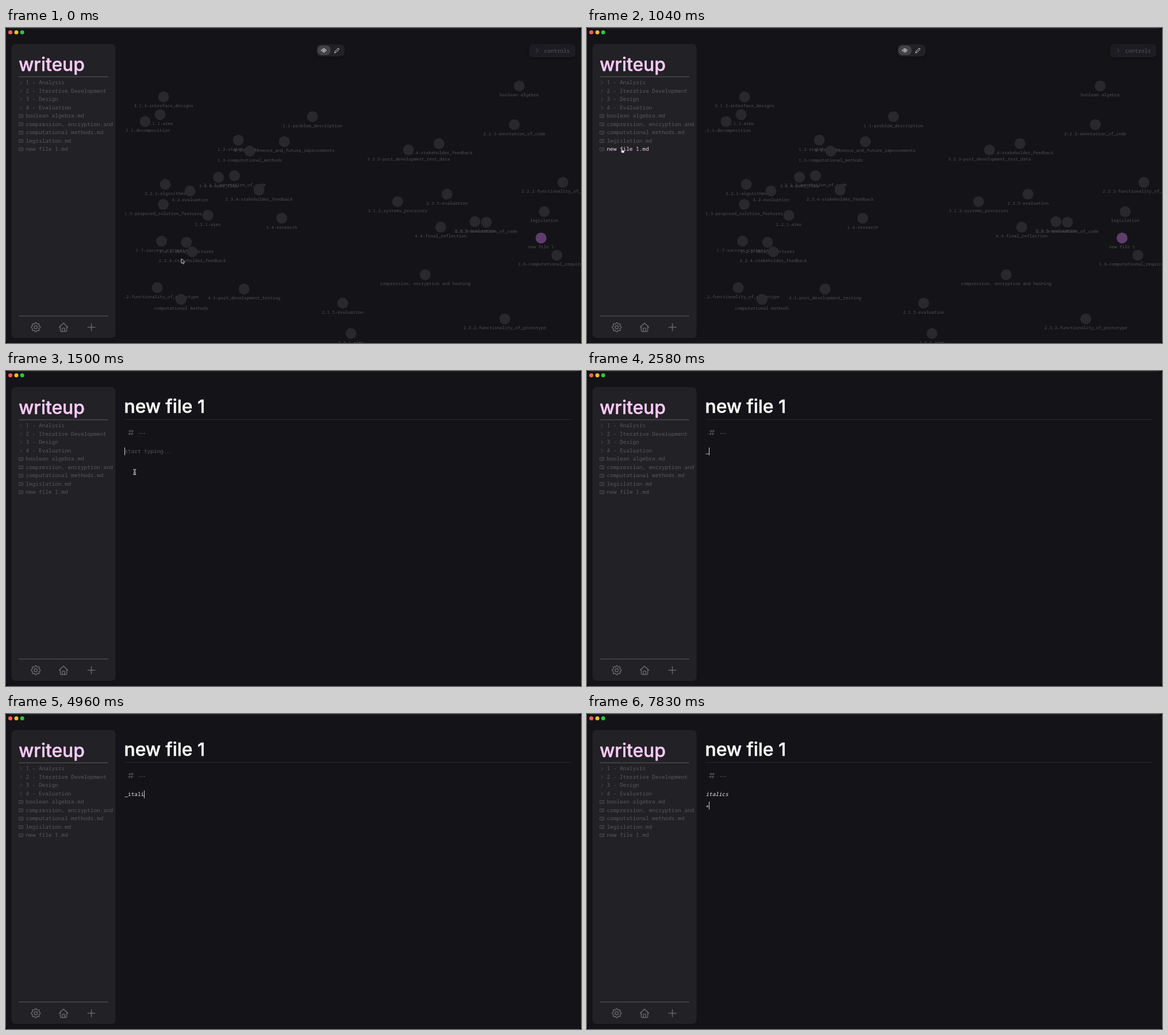
Animation, 1000 px wide and 549 px high, one loop 8000 ms. Source, as an HTML page:

```html
<!DOCTYPE html>
<html lang="en">
<head>
<meta charset="utf-8">
<title>writeup</title>
<style>
  html, body { margin: 0; width: 100%; height: 100%; overflow: hidden; background: #000; }
  svg { display: block; width: 100%; height: 100%; }
  text { font: 9.37px "Noto Sans Mono", "DejaVu Sans Mono", monospace; white-space: pre; }
  .title { font: 500 31.8px Inter, "Open Sans", sans-serif; stroke-width: .5; stroke-linejoin: round; }
  .logo { fill: #fbcbf9; stroke: #fbcbf9; }
  .heading { fill: #fff; stroke: #fff; }
  .dim { fill: #59585c; }
  .hover { fill: #f6d3f5; }
  .icon { fill: none; stroke: #59585c; stroke-linecap: round; stroke-linejoin: round; }
  .big { stroke: #67666b; stroke-width: 1.5; }
  #list path { stroke-width: .8; }
  #nodes circle { fill: #29282d; }
  #nodes circle.current { fill: #5f3e6d; }
  #nodes text { font-size: 7.5px; fill: #505054; text-anchor: middle; }
  #typed, #second { fill: #e6e5e8; }
  #arrow { fill: #111; stroke: #eee; stroke-width: .8; stroke-linejoin: round; }
  #hand { fill: #eee; stroke: #111; stroke-width: .8; stroke-linejoin: round; }
  #beam { fill: none; stroke: #eee; stroke-width: 1.9; stroke-linecap: round; }
  #beam path + path { stroke: #222; stroke-width: .7; }
</style>
</head>
<body>
<svg viewBox="0 0 1000 549" preserveAspectRatio="none">
  <defs>
    <clipPath id="listClip"><rect x="10" y="86" width="176.5" height="400"/></clipPath>
    <clipPath id="graphClip"><rect x="203" y="16" width="797" height="533"/></clipPath>
    <filter id="shadow" x="-20%" y="-40%" width="140%" height="200%">
      <feDropShadow dx="0" dy="2" stdDeviation="3" flood-opacity=".3"/>
    </filter>
  </defs>

  <rect width="1000" height="549" rx="5" fill="#141317"/>
  <path d="M6 .5H994" stroke="#2c2b2f" stroke-width=".8"/>
  <circle cx="7.5" cy="7.5" r="3.5" fill="#ff5f57"/>
  <circle cx="18" cy="7.5" r="3.5" fill="#febc2e"/>
  <circle cx="28.2" cy="7.5" r="3.5" fill="#28c840"/>

  <g id="graph">
    <g id="nodes" clip-path="url(#graphClip)"></g>
    <g filter="url(#shadow)">
      <rect x="540" y="28.5" width="49" height="21" rx="8" fill="#222126"/>
      <rect x="909.5" y="28" width="81" height="23" rx="7" fill="#1e1d21"/>
    </g>
    <rect x="541.8" y="30.6" width="22.4" height="16.6" rx="7" fill="#434247"/>
    <g class="icon" style="stroke:#eee">
      <path d="M548.6 39Q552.8 32.8 557 39Q552.8 45.2 548.6 39Z"/>
      <circle cx="552.8" cy="39" r="1.2"/>
      <path d="M571.6 43L572.2 40.6L577 35.8Q578.2 35 579 36.2Q579.4 37 578.8 37.6L574 42.4Z" stroke-width=".9"/>
    </g>
    <path class="icon" d="M922.6 36.6L925.4 39.4L922.6 42.2"/>
    <text x="935.8" y="42.8" class="dim">controls</text>
  </g>

  <g id="editor">
    <text x="205.5" y="73" class="title heading">new file 1</text>
    <path d="M206 84.5H984" stroke="#29282c"/>
    <path class="icon" d="M213 104.7H222M212.2 109.5H221.2M216 102.6L214.6 111.8M219.8 102.6L218.4 111.8"/>
    <g class="dim">
      <circle cx="232.6" cy="108.8" r=".9"/><circle cx="236.6" cy="108.8" r=".9"/><circle cx="240.6" cy="108.8" r=".9"/>
    </g>
    <text id="placeholder" x="206.5" y="143.3" class="dim">start typing<tspan letter-spacing="-.9">...</tspan></text>
    <text id="typed" x="206.5" y="143.3"></text>
    <text id="second" x="206.5" y="165.6">*</text>
    <rect id="caret" width="1" height="13.5" fill="#d4d4d6"/>
  </g>

  <rect x="9.5" y="28" width="181" height="512" rx="7" fill="#222125"/>
  <text x="22" y="75" class="title logo">writeup</text>
  <path d="M22 85H178M22 502H178" stroke="#5d5c60"/>
  <g id="list" clip-path="url(#listClip)"></g>
  <g class="icon big">
    <path id="gear"/>
    <circle cx="51.7" cy="521.5" r="2.7"/>
    <path d="M92.6 521.4L100 514.4L107.4 521.4M94.4 520V527.6Q94.4 529 95.8 529H104.2Q105.6 529 105.6 527.6V520M97.8 529V524.4Q97.8 523 99.2 523H100.8Q102.2 523 102.2 524.4V529"/>
    <path d="M142.2 521.5H154.8M148.5 515.2V527.8"/>
  </g>

  <g id="mouse">
    <path id="arrow" d="M0 0V8.2L1.9 6.5L3.2 9.3L4.7 8.6L3.4 5.9H6Z"/>
    <path id="hand" d="M-1 .2Q0-.8.8.2V3.2L3.6 3.8Q4.6 4.2 4.4 5.2L3.8 8.4H-.4L-2.6 5.4Q-2.6 4.2-1 5Z"/>
    <g id="beam"></g>
  </g>
</svg>

<script>
const LOOP = 8000, CHAR = 5.62;
const $ = id => document.getElementById(id);

function add(parent, tag, attrs, text = "") {
  const el = document.createElementNS("http://www.w3.org/2000/svg", tag);
  for (const name in attrs) el.setAttribute(name, attrs[name]);
  el.textContent = text;
  return parent.appendChild(el);
}

const nodes = [
  [892.5, 101, "boolean algebra"], [274, 120, "3.1.3-interface_designs"],
  [268, 151, "2.1.1-aims"], [242, 163, "3.1.1-decomposition"],
  [533, 154.5, "1.1-problem_description"], [884, 168.5, "2.2.3-annotation_of_code"],
  [753, 201.5, "2.1.4-stakeholder_feedback"], [700, 212.5, "3.2.3-post_development_test_data"],
  [404, 195.5, "1.2-stakeholders"], [484, 198, "4.3-maintenence_and_future_improvements"],
  [424, 214.5, "1.3-computational_methods"], [397.5, 257.5, "2.1.3-annotation_of_code"],
  [369.5, 260, "3.1.4-user_flow"], [277, 272.5, "3.2.1-algorithms"],
  [320, 284, "4.2-evaluation"], [440, 282.5, "2.3.4-stakeholder_feedback"],
  [273.5, 307.5, "1.5-proposed_solution_features"], [351, 326.5, "2.2.1-aims"],
  [479.5, 331.5, "1.4-research"], [681, 302.5, "3.1.2-systems_processes"],
  [767, 289.5, "2.3.5-evaluation"], [968.5, 269, "2.2.2-functionality_of_prototype"],
  [936, 320, "legislation"], [756, 347, "4.4-final_reflection"],
  [815.5, 337.5, "2.2.5-evaluation"], [835.5, 338.5, "2.3.3-annotation_of_code"],
  [930.5, 366, "new file 1"], [958, 396, "1.6-computational_requirements"],
  [270.5, 371.5, "1.7-success_criteria"], [314, 373.5, "3.2.2-data_structures"],
  [324, 390, "2.2.4-stakeholder_feedback"], [729, 430, "compression, encryption and hashing"],
  [263, 452.5, "2.1.2-functionality_of_prototype"], [304.5, 473, "computational methods"],
  [414, 455, "4.1-post_development_testing"], [585.5, 479.5, "2.1.5-evaluation"],
  [867.5, 507, "2.3.2-functionality_of_prototype"], [600, 532.5, "2.3.1-aims"]
];
for (const [cx, cy, label] of nodes) {
  add($("nodes"), "circle", { cx, cy, r: 9.5, class: label === "new file 1" ? "current" : "" });
  add($("nodes"), "text", { x: cx, y: cy + 18.4 }, label);
}

const entries = ["1 - Analysis", "2 - Iterative Development", "3 - Design", "4 - Evaluation",
  "boolean algebra.md", "compression, encryption and hashing.md", "computational methods.md",
  "legislation.md", "new file 1.md"];
const rows = entries.map((name, i) => {
  const y = 95 + i * 14.5;
  const shape = name.endsWith(".md")
    ? "m-3.4-2.5h2.2q1.2 0 1.2 1q0-1 1.2-1h2.2v5h-2.3q-1.1 0-1.1.6q0-.6-1.1-.6h-2.3zm3.4 1v4.2"
    : "m-1.3-2.5l2.5 2.5l-2.5 2.5";
  add($("list"), "path", { class: "icon", d: `M26.2 ${y + .3}${shape}` });
  return add($("list"), "text", { x: 34.5, y: y + 3.2 }, name);
});

// Gear outline: eight rounded lobes
const gear = Array.from({ length: 64 }, (_, i) => {
  const a = i * Math.PI / 32, r = 7.1 + .85 * Math.tanh(2.5 * Math.cos(8 * a));
  return `${(51.7 + r * Math.sin(a)).toFixed(2)} ${(521.5 - r * Math.cos(a)).toFixed(2)}`;
});
$("gear").setAttribute("d", `M${gear.join("L")}Z`);

// Text cursor: a light outline with a dark core
const beam = "M-1.6-4.2Q0-4.2 0-3V3Q0 4.2-1.6 4.2M1.6-4.2Q0-4.2 0-3M0 3Q0 4.2 1.6 4.2M-1 1H1";
for (let i = 0; i < 2; i++) add($("beam"), "path", { d: beam });

// Editor states: start time, first line, second line (if any), italic flag
const OPEN = 1080, HIDE_MOUSE = 2560;
const edits = [
  [OPEN + 50, ""], [2500, "_"], [2950, "_i"], [3130, "_it"], [3330, "_ita"], [3500, "_ital"],
  [3670, "_itali"], [3880, "_italis"], [4920, "_itali"], [5250, "_italic"], [5290, "_italics"],
  [5710, "italics", null, true], [6750, "italics", "", true], [7830, "italics", "*", true]
];

// Mouse path: time, x, y
const path = [[40, 305, 402], [830, 61, 209.5], [1330, 61, 209.5], [1500, 223.5, 176], [1630, 240, 178]];
const easings = [p => p * p * (3 - 2 * p), p => p, p => p * (.6 + .4 * p), p => p * (2 - p)];

function mouseAt(t) {
  if (t <= path[0][0]) return path[0].slice(1);
  const i = path.findIndex(([time]) => time > t);
  if (i < 0) return path.at(-1).slice(1);
  const [t0, x0, y0] = path[i - 1], [t1, x1, y1] = path[i];
  const p = easings[i - 1]((t - t0) / (t1 - t0));
  return [x0 + (x1 - x0) * p, y0 + (y1 - y0) * p];
}

const show = (id, on) => $(id).setAttribute("display", on ? "inline" : "none");

function render(t) {
  const open = t >= OPEN;
  show("graph", !open);
  show("editor", open);

  const [start, first, second, italic] = edits.findLast(([time]) => time <= t) || edits[0];
  const onSecond = second != null;
  const column = (onSecond ? second : first).length;
  show("placeholder", !first);
  show("second", second === "*");
  $("typed").textContent = first;
  $("typed").style.fontStyle = italic ? "italic" : "normal";
  $("caret").setAttribute("x", Math.round(206 + column * CHAR));
  $("caret").setAttribute("y", onSecond ? 152.8 : 133.3);
  show("caret", t >= start && Math.floor((t - start) / 500) % 2 === 0);

  const [x, y] = mouseAt(t);
  const row = x > 22 && x < 186 ? Math.round((y + 1.5 - 95) / 14.5) : -1;
  const inEditor = open && x > 200;
  rows.forEach((el, i) => el.setAttribute("class", i === row ? "hover" : "dim"));
  $("mouse").setAttribute("transform", `translate(${x} ${y})`);
  show("mouse", t < HIDE_MOUSE);
  show("hand", !!rows[row]);
  show("beam", inEditor);
  show("arrow", !rows[row] && !inEditor);
}

function tick() {
  render(performance.now() % LOOP);
  requestAnimationFrame(tick);
}
tick();
</script>
</body>
</html>
```
